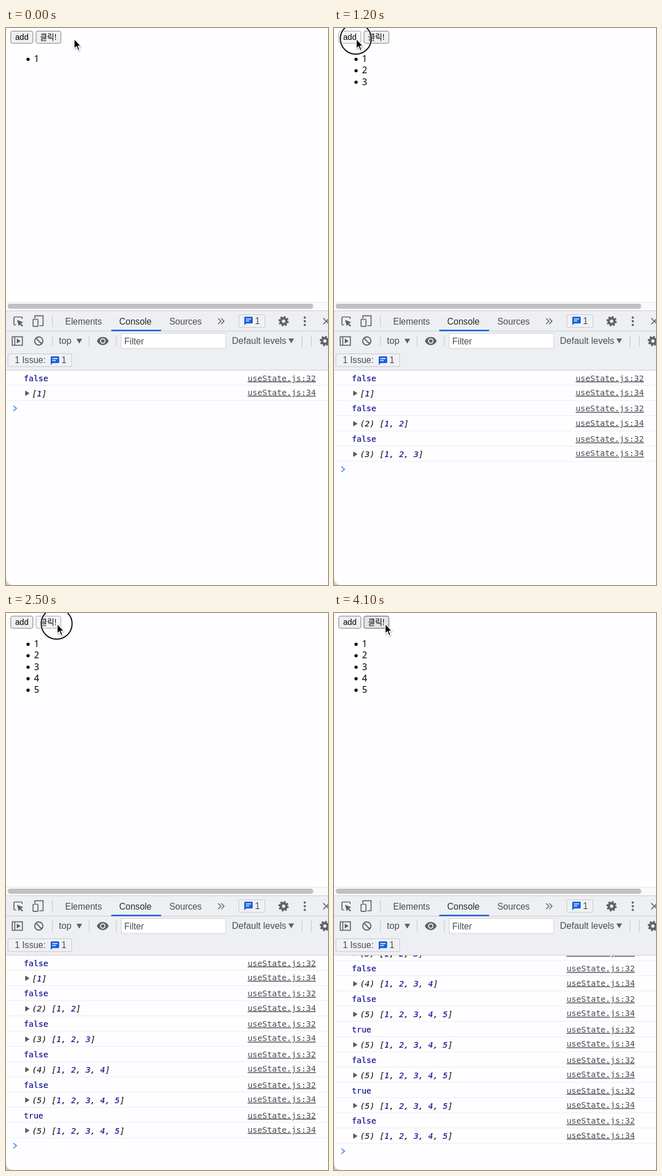
These frames come from a looping animation (569 by 984 pixels, 4.7 s). An HTML page:

```html
<!DOCTYPE html>
<html lang="ko">
<head>
<meta charset="utf-8">
<title>Console</title>
<style>
html, body { margin: 0; width: 100%; height: 100%; overflow: hidden; background: #fefdff; }
svg { display: block; width: 569px; height: 984px; }
text { white-space: pre; }
.ui { font: 15.6px "Liberation Sans", Arial, sans-serif; fill: #4a4d51; }
.dark { fill: #2b2c2f; }
.wide { font-size: 16px; }
.btn { font: 14.2px "Liberation Sans", Arial, sans-serif; text-anchor: middle; }
.ko { font: 13.6px "Noto Sans CJK KR", "Noto Sans CJK", sans-serif; }
.item { font: 16px "Noto Sans", sans-serif; }
.mono { font: 14.3px "DejaVu Sans Mono", monospace; stroke-width: .2; }
.num { fill: #100f8f; stroke: #100f8f; }
.arr { font-style: italic; fill: #222; stroke: #222; }
.link { fill: #4a4a4f; text-anchor: end; text-decoration: underline; }
.icon { fill: none; stroke: #5d6064; stroke-width: 1.7; }
.solid { fill: #5d6064; }
.sep { stroke: #c6c9cd; stroke-width: 1.2; }
.box { fill: #f0f1f4; stroke: #c3c6ca; }
</style>
</head>
<body>
<svg viewBox="0 0 569 984">
  <defs>
    <clipPath id="panel"><rect y="605" width="569" height="379"/></clipPath>
    <g id="gear">
      <circle class="icon" r="5" style="stroke-width:4"/>
      <circle class="icon" r="7.6" style="stroke-width:3" stroke-dasharray="3.3 2.67"/>
    </g>
    <g id="chat">
      <path fill="#1a62dc" d="M1.5 0H13.5Q15 0 15 1.5V10.5Q15 12 13.5 12H3.5L0 15V1.5Q0 0 1.5 0Z"/>
      <path stroke="#fff" stroke-width="1.5" d="M3 4H12M3 7.6H9"/>
    </g>
    <path id="down" class="solid" d="M0 0H10L5 8.5Z"/>
    <filter id="soft" x="-50%" y="-30%" width="220%" height="180%">
      <feDropShadow dx="0.5" dy="1.5" stdDeviation="1.2" flood-opacity=".35"/>
    </filter>
  </defs>
  <rect width="569" height="984" fill="#fefdff"/>

  <g id="buttons"></g>
  <g id="list"></g>

  <!-- scrollbar and toolbars -->
  <rect y="484" width="569" height="15" fill="#fafafb"/>
  <path d="M0 484.5H569" stroke="#e7e7e9"/>
  <rect x="3" y="487" width="540" height="9" rx="4.5" fill="#c1c1c2"/>
  <rect y="499" width="569" height="106" fill="#eeeff3"/>
  <path d="M0 499.5H569M0 535.5H569M0 604.5H569" stroke="#cacccf"/>
  <rect x="186" y="533" width="88" height="2.6" fill="#1a62dc"/>

  <path class="icon" d="M18 524.5H15.5Q14 524.5 14 523V512Q14 510.5 15.5 510.5H27Q28.5 510.5 28.5 512V514"/>
  <path class="solid" d="M19.5 515.5L30.5 519.8L26.3 521.7L30.3 525.7L28.5 527.5L24.5 523.5L22.7 527.3Z"/>
  <path class="icon" d="M51 513V508.3H65.5V526H59"/>
  <rect class="icon" x="47.8" y="514.5" width="8.7" height="12.7" rx="1"/>
  <path class="sep" d="M82 508V528M82 543V563M147 543V563M195 543V563M523 543V563M539.5 543V563"/>
  <text class="ui" x="104.5" y="523.5">Elements</text>
  <text class="ui dark" x="200" y="523.5">Console</text>
  <text class="ui" x="288.7" y="523.5">Sources</text>
  <path class="icon" d="M375 513L379.8 518L375 523M380.5 513L385.3 518L380.5 523" style="stroke-width:1.5"/>
  <rect class="box" x="411.5" y="506.500" width="46" height="22.5" rx="2"/>
  <use href="#chat" x="421" y="510"/>
  <text class="ui" x="440" y="523.3">1</text>
  <use href="#gear" x="490.5" y="518"/>
  <g class="solid"><circle cx="528" cy="511.5" r="2"/><circle cx="528" cy="518" r="2"/><circle cx="528" cy="524.5" r="2"/></g>
  <path class="icon" d="M560.5 512.5L571.5 523.5M571.5 512.5L560.5 523.5"/>

  <rect class="icon" x="11" y="545.5" width="18" height="15"/>
  <path class="icon" d="M15.5 545.5V560.5"/>
  <path class="solid" d="M19 548.7L26 553L19 557.3Z"/>
  <circle class="icon" cx="58" cy="553" r="7.2" style="stroke-width:2"/>
  <path class="icon" d="M53 548L63 558" style="stroke-width:2"/>
  <text class="ui wide" x="93.5" y="558.3">top</text>
  <use href="#down" x="124.5" y="549"/>
  <path class="solid" fill-rule="evenodd" d="M160.5 553Q164 545.8 171 545.8T181.5 553Q178 560.2 171 560.2T160.5 553ZM166.2 553a4.8 4.8 0 1 0 9.6 0a4.8 4.8 0 1 0 -9.6 0Z"/>
  <circle class="solid" cx="171" cy="553" r="3"/>
  <rect x="203.5" y="539.5" width="185" height="26.5" fill="#fff" stroke="#cfd1d5"/>
  <text class="ui" x="209" y="558.5">Filter</text>
  <text class="ui wide" x="399.3" y="558.3">Default levels</text>
  <use href="#down" x="499" y="548.5"/>
  <use href="#gear" x="563.5" y="553"/>
  <rect class="box" x="3.5" y="575.5" width="112.5" height="22.5" rx="2"/>
  <text class="ui" x="15.5" y="592.3">1 Issue:</text>
  <use href="#chat" x="79" y="580"/>
  <text class="ui" x="98" y="592.3">1</text>

  <g clip-path="url(#panel)"><g id="log">
    <g id="rows"></g>
    <path id="prompt" fill="none" stroke="#5a95ec" stroke-width="1.9" d="M13 -4.6L18.6 0L13 4.6"/>
  </g></g>
  <path d="M0 970Q0 984 14 984H0Z" fill="#cbcbcd"/>

  <g id="ring" fill="none">
    <circle r="27.3" stroke="#fff" stroke-opacity=".7" stroke-width="4"/>
    <circle r="27.3" stroke="#111" stroke-width="2"/>
  </g>
  <path id="cursor" filter="url(#soft)" stroke="#fff" stroke-width="1.3" stroke-linejoin="round"
    d="M0 0V17.2L3.9 13.6L6.8 20.5L9.6 19.300L6.7 12.6H11.8Z"/>
</svg>
<script>
const LOOP = 4700, STEP = 100, PAIR = 53.8;
// mouse down and up; the first four clicks add, the rest toggle
const ADDS = [[400, 600], [800, 1000], [1200, 1400], [1500, 1700]];
const TOGGLES = [[2100, 2200], [2400, 2600], [2700, 2900], [3100, 3300]];
const CLICKS = [...ADDS, ...TOGGLES];

const $ = id => document.getElementById(id);
const show = (el, on) => el.setAttribute('display', on ? 'inline' : 'none');
const move = (el, x, y) => el.setAttribute('transform', `translate(${x} ${y})`);
const done = (clicks, t) => clicks.filter(([, up]) => up <= t).length;
const range = n => Array.from({ length: n }, (_, i) => i);

const button = (x, w, label, cls) =>
  `<g><rect x="${x}" y="5.5" width="${w}" height="21.5" rx="3"/>
   <text class="btn ${cls}" x="${x + w / 2}" y="21">${label}</text></g>`;
$('buttons').innerHTML = button(8.5, 39, 'add', '') + button(53, 44, '클릭!', 'ko');

$('list').innerHTML = range(5).map(i =>
  `<g transform="translate(0 ${i * 20.3})"><circle cx="39" cy="55.2" r="2.8"/>
   <text class="item" x="49.5" y="60">${i + 1}</text></g>`).join('');

function logPair(i) {
  const n = Math.min(i + 1, 5);
  const nums = range(n).map(k => `<tspan class="num">${k + 1}</tspan>`).join(', ');
  const size = n > 1 ? `(${n}) ` : '';
  const flag = i > 4 && i % 2 === 1;
  return `<g transform="translate(0 ${i * PAIR})">
    <path d="M0 631H569M0 658H569" stroke="#ececef"/>
    <text class="mono num" x="31.5" y="623.5">${flag}</text>
    <text class="mono link" x="547.5" y="623.5">useState.js:32</text>
    <path d="M34 640.5L41.5 645.3L34 650.1Z" fill="#58595d"/>
    <text class="mono arr" x="46" y="650.6">${size}[${nums}]</text>
    <text class="mono link" x="547.5" y="648.8">useState.js:34</text></g>`;
}
$('rows').innerHTML = range(9).map(logPair).join('');

const buttons = [...$('buttons').children];
const items = [...$('list').children];
const rows = [...$('rows').children];
const links = [...document.querySelectorAll('.link')];

const ease = (t, from, to) => {
  const p = Math.min(1, Math.max(0, (t - from) / (to - from)));
  return p * p * (3 - 2 * p);
};

function draw(time) {
  const t = Math.floor(time / STEP) * STEP;
  const x = 120.5 - 81 * ease(t, 0, 300) + 51 * ease(t, 1700, 2000);
  const pressed = CLICKS.some(([down, up]) => t >= down && t < up);
  move($('cursor'), x, 19.2);
  move($('ring'), x - 1, 19);
  show($('ring'), pressed);

  buttons.forEach((b, i) => {
    const over = i ? x >= 53 && x <= 97 : x >= 8 && x <= 48;
    const [fill, edge] = !over ? ['#efefef', '#7b7b7b'] : pressed ? ['#f5f5f5', '#a5a5a5'] : ['#e5e5e5', '#505050'];
    b.firstChild.setAttribute('fill', fill);
    b.firstChild.setAttribute('stroke', edge);
  });

  const added = 1 + done(ADDS, t);
  const count = added + done(TOGGLES, t);
  items.forEach((el, i) => show(el, i < added));
  rows.forEach((el, i) => show(el, i < count));

  const promptY = 672 + (count - 1) * PAIR;
  const scroll = Math.max(0, promptY - 950.8);
  move($('prompt'), 0, promptY);
  move($('log'), 0, -scroll);
  links.forEach(el => el.setAttribute('x', scroll ? 531.5 : 547.5));
}

const start = performance.now();
function tick() {
  draw((performance.now() - start) % LOOP);
  requestAnimationFrame(tick);
}
tick();
</script>
</body>
</html>
```
